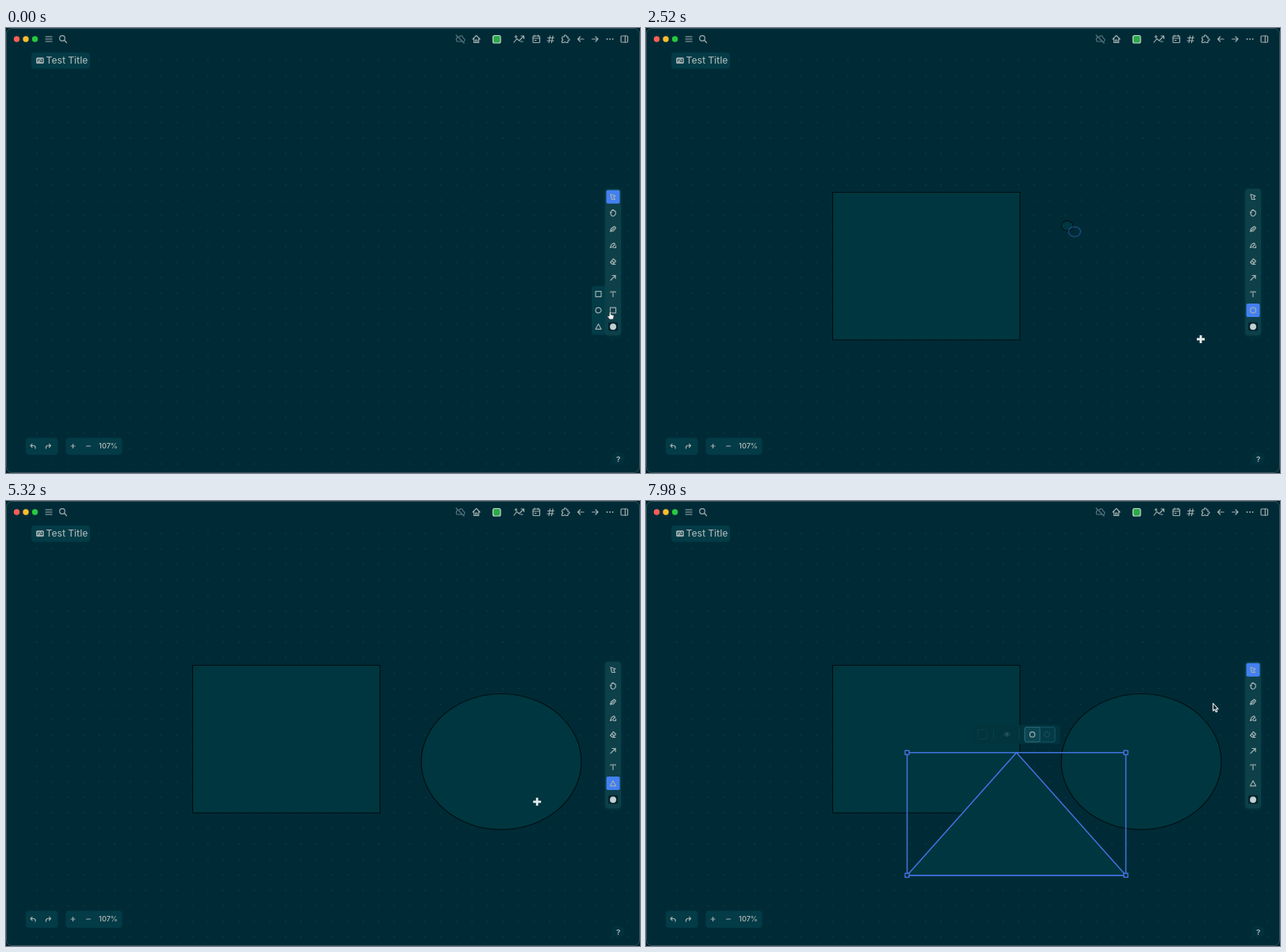
Recreate the animation shown at these times as an HTML page. Size 800 px wide and 562 px high, loop 8 s.

```html
<!DOCTYPE html>
<html lang="en">
<head>
<meta charset="utf-8">
<title>Whiteboard shapes</title>
<style>
  html, body { margin: 0; width: 100%; height: 100%; overflow: hidden; background: #00212a; }
  svg { display: block; width: 800px; height: 562px; }
  text { font-family: Inter, sans-serif; fill: #a3b0b1; }
  .panel { fill: #033b46; }
  .icon { fill: none; stroke: #a0adae; stroke-width: 1.2; stroke-linecap: round; stroke-linejoin: round; }
  .solid { fill: #a0adae; stroke: none; }
  .dim { stroke: #577780; }
  .shape { fill: #00363f; stroke: #000d12; stroke-width: 1.1; }
  .blue { fill: none; stroke: #4274e2; stroke-width: 1.5; }
  .handle { fill: #002b36; stroke: #4b82f4; stroke-width: 1.2; }
</style>
</head>
<body>
<svg viewBox="0 0 800 562">
  <defs>
    <pattern id="dots" x="29.3" y="31.2" width="19.6" height="19.6" patternUnits="userSpaceOnUse">
      <circle cx="9.8" cy="9.8" r=".65" fill="#164650"/>
    </pattern>
    <filter id="shadow" x="-60%" y="-10%" width="220%" height="120%">
      <feDropShadow dx="0" dy="1" stdDeviation="2" flood-color="#0b4653" flood-opacity=".5"/>
    </filter>
  </defs>

  <rect x=".5" y=".5" width="799" height="561" rx="7" fill="#002b36" stroke="#3a525a"/>
  <rect x="20" y="31" width="770" height="525" fill="url(#dots)"/>

  <g id="shapes"></g>
  <g id="selection">
    <path id="outline" class="blue"/>
    <path id="bounds" class="blue"/>
    <g id="handles"></g>
  </g>
  <g id="bar">
    <rect x="-55" width="110" height="24" rx="4" fill="#02343e"/>
    <rect x="-49" y="6" width="12" height="12" rx="2" fill="none" stroke="#06414c"/>
    <path d="M-29 6V18M3 6V18" stroke="#07424d"/>
    <path d="M-16 12Q-12 7-8 12Q-12 17-16 12Z" fill="none" stroke="#285660"/>
    <circle cx="-12" cy="12" r="1.4" fill="#31606a"/>
    <rect x="10.500" y="3" width="38" height="18.500" rx="2" fill="#033a46" stroke="#17566a"/>
    <rect x="10.500" y="3" width="19" height="18.500" rx="2" fill="#0b4552" stroke="#2d6876"/>
    <circle cx="20" cy="12.200" r="3.200" class="icon"/>
    <circle cx="38.500" cy="12.200" r="3.200" fill="none" stroke="#37616b" stroke-dasharray="1.500 1"/>
  </g>

  <g id="window-buttons"></g>
  <g class="icon">
    <path d="M50 11H58M50 14H58M50 17H58"/>
    <circle cx="71" cy="13" r="3.300"/><path d="M73.500 15.500L76.500 18.500"/>
    <path class="dim" d="M570 11Q567 14 569 17H576M572 11Q576 8 577 13Q580 14 578 17M568 9L578 19"/>
    <path d="M589 14L593.500 9.500L598 14M590.500 13V18.500H596.500V13M592.500 18V15H594.500V18"/>
    <path d="M641 18L644.500 13.500L647.500 16L653 10.500M650 10H653.500V13.500M642 11H645M643.500 9.500V12.500M649 17H652"/>
    <rect x="665" y="10" width="8.500" height="8.500" rx="1"/><path d="M665 13H673.500M667 9V11M671.500 9V11M667.500 15.700H669"/>
    <path d="M686.500 10L685 18.500M690 10L688.500 18.500M683.500 12.500H691.500M683 16H691"/>
    <path d="M702 11H704.500Q704 8.500 706 9Q707.500 9 707 11H709V13.500Q711.500 13.500 711 15Q711 16 709 16V18.500H706.500Q705.500 16 704 18.500H701.500V16Q704 15.500 701.500 13.500Z"/>
    <path d="M729 14H721.500L724.500 11M721.500 14L724.500 17M739.500 14H747L744 11M747 14L744 17"/>
    <rect x="776" y="10" width="8.500" height="8" rx="1"/><path d="M781.300 10V18"/>
    <path d="M758.500 14H758.600M762 14H762.100M765.500 14H765.600" stroke-width="1.800"/>
  </g>
  <rect x="614.500" y="9.500" width="9.500" height="9.500" rx="2" fill="#2fa84b" stroke="#c4ddcb" stroke-width="1.200"/>

  <rect class="panel" x="32" y="31" width="74" height="20.500" rx="4"/>
  <rect class="solid" x="38" y="37.200" width="9.800" height="7.800" rx="1.500"/>
  <path d="M40 42.500Q40 38.500 42.500 40T43 43M44.500 39.500H46V42.500H44.500" fill="none" stroke="#033b46"/>
  <text x="50.500" y="45.200" font-size="12" font-weight="500">Test Title</text>

  <rect class="panel" x="25" y="517.500" width="40.500" height="21.500" rx="4"/>
  <rect class="panel" x="75.500" y="517.500" width="71" height="21.500" rx="4"/>
  <g class="icon">
    <path d="M33 525.500L31 527.500L33 529.500M31 527.500H35.500Q37.500 528 37 531"/>
    <path d="M54.500 525.500L56.500 527.500L54.500 529.500M56.500 527.500H52Q50 528 50.500 531"/>
    <path d="M82 528H87M84.500 525.500V530.500M101.500 528H106.500"/>
  </g>
  <text x="129" y="531.300" font-size="9" font-weight="600" text-anchor="middle">107%</text>
  <circle cx="772.500" cy="544" r="8" fill="#01313c"/>
  <text x="772.700" y="547.500" font-size="9.500" font-weight="700" text-anchor="middle">?</text>

  <g id="flyout">
    <rect class="panel" x="739" y="326" width="19" height="61.500" rx="4"/>
    <g id="choices"></g>
  </g>
  <rect x="756" y="203" width="20" height="185" rx="4" fill="#073f4a" filter="url(#shadow)"/>
  <rect id="active" x="757.500" width="17" height="17" rx="2" fill="#4380f2"/>
  <g class="icon" id="tools">
    <path d="M763 210L769 212L766.500 213.500L768.500 216.500H764.500Z"/>
    <path d="M763.500 236L762.500 232.500L764 233V230.500H765.200V229.500H766.600V230.500H768V231.500H769.200V235Q768 238 765 237.500Z"/>
    <path d="M762.500 257L763.500 253.500L767.500 250.500L769.500 252.500L766.500 256.500ZM764 256L767 253"/>
    <path d="M762.500 277.500L764 273.500L767 271.500L768.500 273L765.500 276.500ZM766.500 277.500H769.500V275"/>
    <path d="M762.500 296L766.500 291.500L769.500 294.500L765.500 298.500ZM764.500 294L767.500 297M765.500 298.500H769"/>
    <path d="M763 318.500L769 312.500M765 312.500H769V316.500"/>
    <path d="M763 334V333H769V334M766 333V339.500"/>
    <path id="shape-icon"/>
  </g>
  <rect x="760" y="371.500" width="12" height="11" rx="2" fill="#00232d"/>
  <circle cx="766" cy="377.300" r="4" fill="#c1d0d1"/>

  <g id="cursor" stroke-linejoin="round">
    <path id="arrow" d="M-2.500-5.500V4L-.3 2.200L1.200 5.500L2.800 4.700L1.300 1.700H4Z" fill="#13252b" stroke="#e3e9e9" stroke-width="1.100"/>
    <path id="cross" d="M0-5V5M-5 0H5" fill="none" stroke="#e6ebeb" stroke-width="2.800"/>
    <path id="hand" d="M-1.500-5Q0-6 .4-4V-1L3-.5Q4.500 0 4 2L3 5H-1.500L-4 1.500Q-4 0-2 1Z" fill="#f2f4f4" stroke="#152c33" stroke-width=".7"/>
  </g>
</svg>
<script>
const LOOP = 8000, STEP = 70;
const $ = id => document.getElementById(id);
const add = (parent, tag, attrs) => {
  const el = document.createElementNS('http://www.w3.org/2000/svg', tag);
  for (const key in attrs) el.setAttribute(key, attrs[key]);
  return $(parent).appendChild(el);
};
const show = (el, on) => el.style.display = on ? '' : 'none';
const clamp = v => Math.max(0, Math.min(1, v));
const ease = v => v * v * (3 - 2 * v);
const mix = (a, b, p) => a + (b - a) * p;
const within = (t, [from, to]) => t >= from && t < to;

function outline(kind, [x, y, x2, y2]) {
  const cx = (x + x2) / 2, rx = Math.abs(x2 - x) / 2, ry = Math.abs(y2 - y) / 2;
  if (kind === 'circle') {
    const cy = (y + y2) / 2;
    return `M${cx - rx} ${cy}a${rx} ${ry} 0 1 1 ${2 * rx} 0a${rx} ${ry} 0 1 1 ${-2 * rx} 0Z`;
  }
  const top = Math.min(y, y2), bottom = Math.max(y, y2);
  if (kind === 'triangle') return `M${cx} ${top}L${x2} ${bottom}H${x}Z`;
  return `M${x} ${top}H${x2}V${bottom}H${x}Z`;
}

// pick: tool chosen; draw: drag span; until: end of selection
const steps = [
  { kind: 'box', box: [235.5, 207.5, 472, 394], pick: 210, draw: [560, 910], until: 1820 },
  { kind: 'circle', box: [524, 243.5, 726, 415], pick: 1820, draw: [2450, 2870], until: 5110 },
  { kind: 'triangle', box: [322, 392, 598, 237], pick: 5110, draw: [6230, 6790], until: LOOP }
];
const flyoutSpans = [[0, 280], [1540, 1890], [4550, 5180]];
const path = [
  [0, 763, 363], [140, 748, 338], [210, 748, 338], [500, 235, 207], [560, 235, 207],
  [910, 472, 394], [1050, 497, 371], [1540, 765, 358], [1750, 748, 358], [1820, 748, 358],
  [2310, 524, 243], [2400, 524, 243], [2520, 700, 393], [2870, 726, 415], [3640, 726, 415],
  [4340, 758, 380], [4550, 765, 358], [4900, 748, 377], [5110, 748, 377], [5880, 321.5, 392.5],
  [6230, 321.5, 392.5], [6790, 598, 237], [7210, 467, 335], [7280, 467, 335],
  [7630, 474.5, 416], [7700, 474.5, 416], [7980, 718, 261]
];

for (const [x, color] of [[13.5, '#ff5f57'], [25, '#febc2e'], [36.5, '#28c840']])
  add('window-buttons', 'circle', { cx: x, cy: 14, r: 3.7, fill: color });

const glyph = (kind, x, y) => outline(kind, [x - 3.5, y - 3.3, x + 3.5, y + 3.3]);
steps.forEach((s, i) => {
  add('choices', 'path', { class: 'icon', d: glyph(s.kind, 747.5, 336 + i * 20.5) });
  s.el = add('shapes', 'path', { class: 'shape' });
});
const ghost = add('shapes', 'path', { class: 'blue', opacity: .4 });
const handles = [0, 1, 2, 3].map(() => add('handles', 'rect', { class: 'handle', width: 5, height: 5 }));

function cursorAt(t) {
  const i = Math.max(1, path.findIndex(p => p[0] >= t));
  const [a, b] = [path[i - 1], path[i]];
  const p = ease(clamp((t - a[0]) / (b[0] - a[0])));
  return [mix(a[1], b[1], p), mix(a[2], b[2], p)];
}

function select(kind, box) {
  const [x, y, x2, y2] = box;
  const top = Math.min(y, y2);
  $('outline').setAttribute('d', outline(kind, box));
  $('bounds').setAttribute('d', outline('box', box));
  handles.forEach((h, i) => {
    h.setAttribute('x', (i % 2 ? x2 : x) - 2.5);
    h.setAttribute('y', (i < 2 ? y : y2) - 2.5);
  });
  $('bar').setAttribute('transform', `translate(${(x + x2) / 2} ${top - 35})`);
}

function render(t) {
  const current = steps.findLast(s => t >= s.pick);
  const drawingTool = current && t < current.draw[1];
  const moving = within(t, [7280, 7630]);
  const moved = ease(clamp((t - 7280) / 350));
  let selected = false;
  show(ghost, false);

  for (const s of steps) {
    const [start, end] = s.draw;
    const [x, y, x2, y2] = s.box;
    const p = ease(clamp((t - start) / (end - start)));
    let box = [x, y, mix(x, x2, p), mix(y, y2, p)];
    if (s.kind === 'triangle') box = box.map((v, i) => v + moved * (i % 2 ? 80.7 : 7.5));
    show(s.el, t > start);
    s.el.setAttribute('d', outline(s.kind, box));
    if (within(t, [start + 1, end])) {
      const lag = 10 * (1 - p);
      ghost.setAttribute('d', outline(s.kind, box.map((v, i) => v + (i % 2 ? .8 : 1) * lag)));
      show(ghost, true);
    }
    if (within(t, [end, s.until])) {
      selected = true;
      select(s.kind, box);
    }
  }
  show($('selection'), selected);
  show($('bar'), selected && !moving);

  const open = flyoutSpans.some(span => within(t, span));
  show($('flyout'), open);
  $('active').setAttribute('y', drawingTool ? 348 : 204.7);
  $('shape-icon').setAttribute('d', glyph(current ? current.kind : 'box', 766, 356.5));

  const [cx, cy] = cursorAt(t);
  $('cursor').setAttribute('transform', `translate(${cx} ${cy})`);
  show($('hand'), open);
  show($('cross'), !open && drawingTool);
  show($('arrow'), !open && !drawingTool);
}

function frame() {
  const t = performance.now() % LOOP;
  render(Math.floor(t / STEP) * STEP);
  requestAnimationFrame(frame);
}
frame();
</script>
</body>
</html>
```
